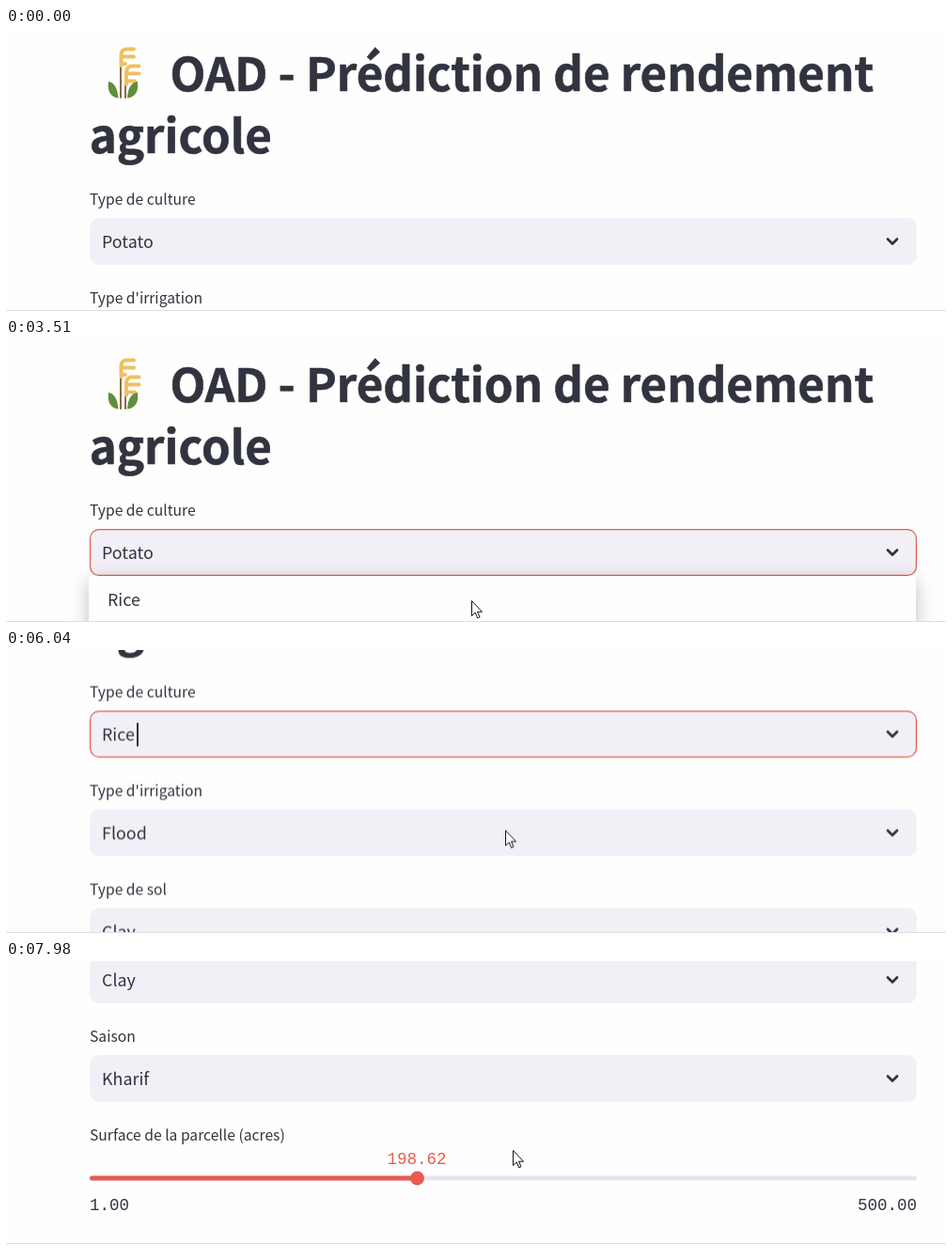
Write an HTML page that moves like this. It is 1000 px wide and 301 px high and loops after 8000 ms.

```html
<!DOCTYPE html>
<html lang="fr">
<head>
<meta charset="utf-8">
<title>Prédiction de rendement</title>
<style>
  html, body { margin: 0; width: 100%; height: 100%; overflow: hidden; background: #fefefe; }
  svg { display: block; width: 1000px; height: 301px; }
  text { font-family: "Noto Sans CJK JP", "Noto Sans CJK SC", "Noto Sans CJK", "Noto Sans", sans-serif; fill: #31333f; white-space: pre; }
  .title { font-size: 49.2px; font-weight: 700; stroke: #31333f; stroke-width: .6; }
  .label { font-size: 15.67px; }
  .value { font-size: 17.9px; }
  .mono { font: 17.5px "Liberation Mono", monospace; }
  .accent { fill: #ea5a50; }
  .box { fill: #f2f0f6; }
  .chevron { fill: none; stroke: #31333f; stroke-width: 2.7; stroke-linecap: round; stroke-linejoin: round; }
  .caret { fill: #31333f; }
  #focus { fill: none; stroke: #e2604f; stroke-width: 1.25; }
  #sheet { fill: #fefefe; filter: drop-shadow(0 5px 10px rgba(0, 0, 0, .25)); }
  .ear, .stalk { fill: none; stroke-linecap: round; stroke-linejoin: round; }
  .ear { stroke: #f0c060; stroke-width: 4; }
  .stalk { stroke: #8a6a45; stroke-width: 2; }
  .leaf { fill: #5f8f3c; }
</style>
</head>
<body>
<svg viewBox="0 0 1000 301">
  <defs><clipPath id="listArea"><rect x="88" y="252" width="880" height="49"/></clipPath></defs>

  <g id="page">
    <path class="stalk" d="M122 40V74M127 60V74"/>
    <path class="ear" d="M122.500 40V28Q123 23 128 22.500H136M123 30.500H136M123 38H127"/>
    <path class="ear" d="M128 60V47Q128.500 41 133 40.500H141.500M129 48.500H141.500M128 56.500H137"/>
    <path class="leaf" d="M109 57Q118 58 119.500 74.500Q107 73 109 57Z"/>
    <path class="leaf" d="M140 57Q130 58 129 74.500Q142 73 140 57Z"/>
    <text class="title" x="174.500" y="67">OAD - Prédiction de rendement</text>
    <text class="title" x="88.700" y="133">agricole</text>

    <g id="fields"></g>
    <rect id="focus" x="89.600" y="202.600" width="878.800" height="48.800" rx="9.400"/>
    <text id="before" class="value" x="102" y="234">Potato</text>
    <text id="after" class="value" x="102" y="234">Rice</text>
    <rect id="caretBefore" class="caret" x="159" y="215" width="2" height="25"/>
    <rect id="caretAfter" class="caret" x="139" y="215" width="2" height="25"/>

    <text class="label" x="89" y="608">Surface de la parcelle (acres)</text>
    <text class="mono accent" x="437" y="633" text-anchor="middle">198.62</text>
    <rect x="89" y="645.500" width="880" height="5" rx="2.500" fill="#e6e6ee"/>
    <rect class="accent" x="89" y="645.500" width="348.500" height="5" rx="2.500"/>
    <circle class="accent" cx="437.500" cy="648" r="7.500"/>
    <text class="mono" x="89" y="682">1.00</text>
    <text class="mono" x="969" y="682" text-anchor="end">500.00</text>
  </g>

  <g id="popup">
    <rect id="sheet" x="88" y="252" width="880" height="380" rx="4"/>
    <g clip-path="url(#listArea)"><g id="options"></g></g>
  </g>

  <circle id="press" cx="939" cy="219" r="15" fill="#ff0" fill-opacity=".4"/>
  <g id="cursor">
    <path id="arrow" d="M.500 .500V16.500L4.200 13 6.700 18.800 9 17.800 6.500 12.200H11.500Z" fill="#fff" stroke="#111" stroke-linejoin="round"/>
    <g id="beam" fill="none">
      <path d="M-3.500 -8H-1L0 -7 1 -8H3.500M0 -7V7M-3.500 8H-1L0 7 1 8H3.500" stroke="#fff" stroke-width="2.600"/>
      <path d="M-3.500 -8H-1L0 -7 1 -8H3.500M0 -7V7M-3.500 8H-1L0 7 1 8H3.500" stroke="#111" stroke-width="1.200"/>
    </g>
  </g>
  <rect y="300" width="1000" height="1" fill="#dedee2"/>
</svg>

<script>
const LOOP = 8000;
const byId = id => document.getElementById(id);

// Static parts that repeat
const fields = [
  ["Type de culture", ""],
  ["Type d'irrigation", "Flood"],
  ["Type de sol", "Clay"],
  ["Saison", "Kharif"],
];
byId("fields").innerHTML = fields.map(([label, value], i) => `
  <g transform="translate(0 ${i * 105})">
    <text class="label" x="89" y="188">${label}</text>
    <rect class="box" x="89" y="202" width="880" height="50" rx="10"/>
    <text class="value" x="102" y="234">${value}</text>
    <path class="chevron" d="M938 224.500l5 5 5-5"/>
  </g>`).join("");

const crops = ["Barley", "Carrot", "Cotton", "Maize", "Potato", "Rice", "Soybean"];
byId("options").innerHTML = crops.map((crop, i) =>
  `<text class="value" x="108" y="${284 + i * 50}">${crop}</text>`).join("");

// Timeline helpers: every step is [time, ..., easing towards the next step]
const play = (id, frames) =>
  byId(id).animate(frames, { duration: LOOP, iterations: Infinity });

function move(id, steps) {
  const frame = ([time, x, y, easing = "linear"]) =>
    ({ offset: time / LOOP, transform: `translate(${x}px, ${y}px)`, easing });
  const [, x, y] = steps[steps.length - 1];
  play(id, [...steps, [LOOP, x, y]].map(frame));
}

function fade(id, steps) {
  play(id, steps.map(([time, opacity, easing = "linear"]) =>
    ({ offset: time / LOOP, opacity, easing })));
}

// Visible only within the given time ranges, with hard changes
function show(id, ...ranges) {
  const steps = ranges.flatMap(([from, to]) => [[from, 1], [to, 0]]);
  if (steps[0][0] > 0) steps.unshift([0, 0]);
  const end = steps[steps.length - 1];
  if (end[0] === LOOP) end[1] = 1;
  else steps.push([LOOP, 0]);
  fade(id, steps.map(([time, opacity]) => [time, opacity, "step-end"]));
}

move("page", [
  [0, 0, 0], [5220, 0, 0, "ease-out"],
  [5460, 0, -127], [5970, 0, -127, "ease-in-out"],
  [6220, 0, -190], [7150, 0, -190],
  [7240, 0, -272], [7335, 0, -272, "ease-out"],
  [7570, 0, -317], [7860, 0, -317],
  [7980, 0, -417],
]);

move("cursor", [
  [0, 934, 304], [970, 934, 304, "ease-in-out"],
  [1610, 941, 220.5], [2670, 941, 220.5, "ease-in-out"],
  [2980, 495, 278], [4640, 495, 278, "ease-in-out"],
  [4890, 531, 191.5], [6450, 531, 191.5, "step-end"],
  [6460, 531, 187], [6480, 531, 187, "ease-in-out"],
  [6920, 539, 201],
]);
show("arrow", [0, 1330], [2830, 4715], [4850, LOOP]);
show("beam", [1330, 2830], [4715, 4850]);
show("press", [1910, 2100]);

show("focus", [2100, LOOP]);
show("before", [0, 4130]);
show("after", [4130, LOOP]);
show("caretBefore", [2150, 2690], [3220, 3510], [3930, 4130]);
show("caretAfter", [4130, 4700], [5240, 5590], [5990, 6460], [6900, LOOP]);

fade("popup", [[0, 0], [2100, 0, "ease-out"], [2400, 1], [4130, 1, "ease-out"], [4330, 0], [LOOP, 0]]);
move("options", [[0, 0, 0], [2960, 0, 0, "ease-in-out"], [3250, 0, -250]]);
</script>
</body>
</html>
```
